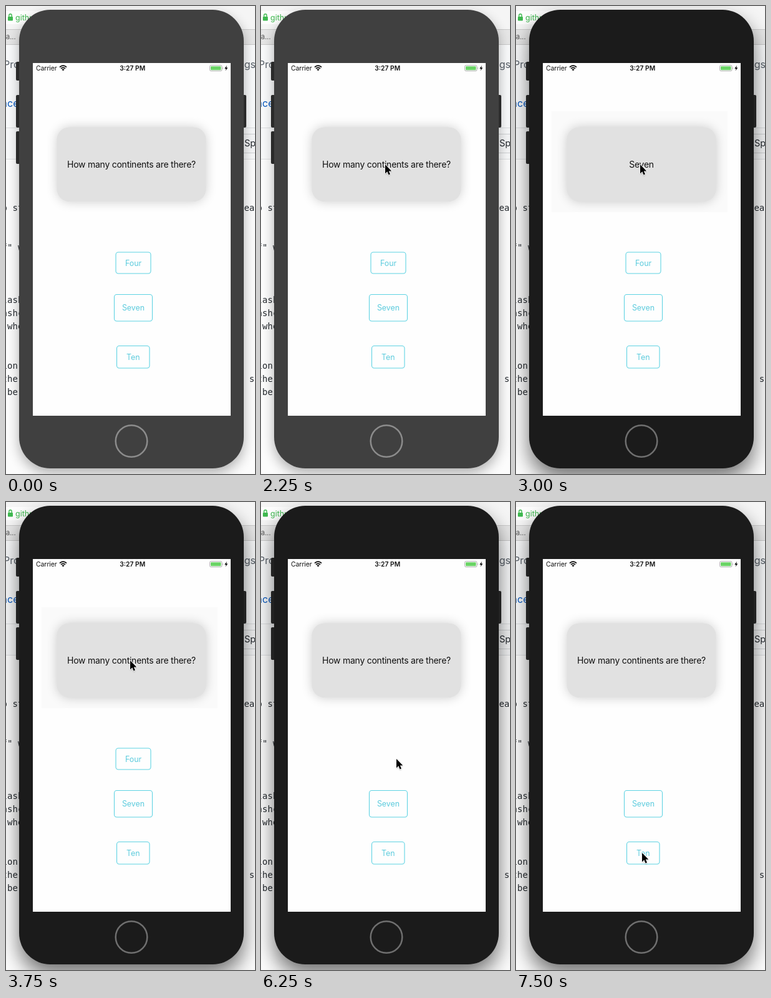
An HTML page for the animation above (8 s loop, 399 by 747 pixels).

```html
<!DOCTYPE html>
<html lang="en">
<head>
<meta charset="utf-8">
<title>Flashcard app</title>
<style>
  html, body { margin: 0; width: 100%; height: 100%; overflow: hidden; background: #f8f8f8; }
  svg { display: block; width: 399px; height: 747px; }
  text { font-family: Inter, Roboto, sans-serif; white-space: pre; }
  .code text { font: 14px "DejaVu Sans Mono", monospace; fill: #24292e; }
  .choice rect { fill: none; stroke: #5fd3e3; stroke-width: 1.1; }
  .choice text { font-size: 12.4px; fill: #5ccbdd; text-anchor: middle; }
</style>
</head>
<body>
<svg viewBox="0 0 399 747">
  <defs>
    <filter id="blur" x="-30%" y="-30%" width="160%" height="160%"><feGaussianBlur stdDeviation="9"/></filter>
    <filter id="phoneBlur" x="-30%" y="-30%" width="160%" height="160%"><feGaussianBlur id="spread" stdDeviation="10"/></filter>
    <filter id="cursorBlur" x="-50%" y="-50%" width="200%" height="200%"><feGaussianBlur stdDeviation="1"/></filter>
    <clipPath id="screen"><rect x="43" y="91" width="317" height="563"/></clipPath>
    <path id="arrow" d="M0 0V14.4L3.3 11.3L5.5 16.5L8 15.4L5.8 10.4H10.3Z"/>
  </defs>

  <!-- browser window behind the simulator -->
  <rect width="399" height="747" fill="#fcfcfc"/>
  <rect width="399" height="37" fill="#f5f5f5"/>
  <rect y="8" width="200" height="21" fill="#fdfdfd"/>
  <rect y="37" width="399" height="25" fill="#e6e6e6"/>
  <path d="M0 37.5H399M0 61.5H399" stroke="#c9c9c9"/>
  <rect y="62" width="399" height="132" fill="#f9fafb"/>
  <rect y="195" width="399" height="49" fill="#f7f8f9"/>
  <path d="M0 194.5H399M0 244.5H399" stroke="#dcdee0"/>
  <rect x="3" y="17" width="8" height="6.5" rx="1" fill="#3fb950"/>
  <path d="M4.8 17V15a2.2 2.2 0 0 1 4.4 0V17" fill="none" stroke="#3fb950" stroke-width="1.4"/>
  <text x="15" y="22.5" font-size="12.5" fill="#3fb950">github</text>
  <text x="0" y="53" font-size="11" fill="#555">a...</text>
  <text x="-4" y="98.500" font-size="16" fill="#586069">Projects</text>
  <text x="400" y="98.500" font-size="16" fill="#586069" text-anchor="end">ngs</text>
  <text x="20.500" y="161" font-size="16" fill="#0b5bc0" text-anchor="end">nce</text>
  <rect x="376.500" y="204.500" width="40" height="30" rx="3" fill="#f5f6f7" stroke="#cfd1d3"/>
  <text x="382" y="224" font-size="14.500" fill="#24292e">Sp</text>
  <g class="code" id="code"></g>

  <!-- phone -->
  <rect id="shade" x="21" y="6" width="360" height="732" rx="50" filter="url(#phoneBlur)"/>
  <path id="keys" d="M21 89H18q-2 0-2 2V117q0 2 2 2H21ZM21 142H18q-2 0-2 2V192q0 2 2 2H21ZM21 200H18q-2 0-2 2V250q0 2 2 2H21ZM380 142H383q2 0 2 2V192q0 2-2 2H380Z"/>
  <rect id="body" x="21" y="6" width="360" height="732" rx="50"/>
  <circle id="home" cx="201" cy="694.500" r="25.300" fill="none" stroke-width="2.500"/>
  <rect x="43" y="91" width="317" height="563" fill="#fefefe"/>

  <!-- status bar -->
  <text x="48" y="103" font-size="10.500" fill="#111" letter-spacing="-.1">Carrier</text>
  <g fill="none" stroke="#000" stroke-width="1.700">
    <path d="M86 97.700Q91.500 92.700 97 97.700M88 99.900Q91.500 96.900 95 99.900"/>
  </g>
  <path d="M89.400 101.300Q91.500 99.700 93.600 101.300L91.500 103.400Z"/>
  <text x="202.700" y="103" font-size="10.300" font-weight="600" fill="#111" text-anchor="middle">3:27 PM</text>
  <rect x="326.500" y="94.700" width="19.500" height="9" rx="2" fill="#fff" stroke="#9a9a9a" stroke-width=".8"/>
  <rect x="328" y="96.200" width="16.500" height="6" rx=".8" fill="#6ad465"/>
  <path d="M347 97.500q1.400 1.700 0 3.400Z" fill="#888"/>
  <path d="M354 94.800L350.300 99.900H352.600L351.600 103.600L355.400 98.400H353Z"/>

  <!-- card -->
  <g clip-path="url(#screen)">
    <rect id="halo" x="57" y="168" width="282" height="161" fill="#fafafa"/>
    <rect x="82" y="194" width="238" height="118" rx="20" fill="#000" opacity=".2" filter="url(#blur)"/>
    <rect x="81.500" y="193.500" width="239" height="118.500" rx="20" fill="#e1e1e1"/>
  </g>
  <text id="label" x="201" y="258" font-size="14" letter-spacing="-.25" fill="#111" text-anchor="middle"></text>

  <g id="choices"></g>

  <g id="cursor">
    <use href="#arrow" y="1.500" fill="#000" opacity=".35" filter="url(#cursorBlur)"/>
    <use href="#arrow" stroke="#fff" stroke-width="1.600" stroke-linejoin="round" paint-order="stroke"/>
  </g>
</svg>
<script>
const NS = "http://www.w3.org/2000/svg";
const $ = id => document.getElementById(id);
const LOOP = 8000;

function set(el, attrs) {
  for (const key in attrs) el.setAttribute(key, attrs[key]);
  return el;
}

function add(parent, tag, attrs, text = "") {
  const el = set(document.createElementNS(NS, tag), attrs);
  el.textContent = text;
  return parent.appendChild(el);
}

// code rows: line number, visible text, column
const column = i => -6.4 + 8.43 * i;
[[0, "o st", 0], [0, "ea", 46], [3, "f\" w", 0], [7, "lash", 0], [8, "ashc", 0], [9, " whe", 0],
 [12, "ion", 0], [13, "the", 0], [13, "s", 47], [14, " ber", 0]]
  .forEach(([row, text, col]) =>
    add($("code"), "text", { x: column(col), y: 327 + 21 * row }, text));

function choice(text, x, y, width, height) {
  const g = add($("choices"), "g", { class: "choice" });
  add(g, "rect", { x, y, width, height, rx: 4 });
  add(g, "text", { x: x + width / 2, y: y + height / 2 + 4.7 }, text);
  return g;
}
const four = choice("Four", 176, 393, 56, 34);
choice("Seven", 173.5, 460.5, 61, 42.5);
choice("Ten", 177.5, 542.5, 52.5, 35.5);

const stops = [
  [1000, 391, 201], [1250, 321, 222], [1500, 320, 224], [1750, 239, 240], [2000, 205, 248],
  [2250, 199, 253], [4500, 248, 327], [4750, 253, 340], [5000, 252, 393], [5250, 218, 412],
  [5500, 203, 410], [5750, 200, 410], [6000, 203, 410], [6250, 217, 410], [6500, 322, 487],
  [6750, 322, 493], [7000, 283, 539], [7250, 234, 555], [7500, 202, 560]
];

const show = (el, on) => set(el, { visibility: on ? "visible" : "hidden" });

function draw(t) {
  const active = t >= 2750;
  const flipped = t >= 3000 && t < 3750;
  set($("body"), { fill: active ? "#1b1b1b" : "#404040" });
  set($("keys"), { fill: active ? "#222" : "#2a2a2a" });
  set($("home"), { stroke: active ? "#6f6f6f" : "#8c8c8c" });
  set($("shade"), { opacity: active ? 0.55 : 0.3, transform: `translate(0 ${active ? 16 : 8})` });
  set($("spread"), { stdDeviation: active ? 16 : 10 });

  show($("halo"), t >= 3000 && t < 4750);
  $("label").textContent = flipped ? "Seven" : "How many continents are there?";
  show(four, t < 6000);

  const stop = stops.filter(s => s[0] <= t).pop();
  show($("cursor"), stop);
  if (stop) set($("cursor"), { transform: `translate(${stop[1]} ${stop[2]})` });
}

const start = performance.now();
function tick() {
  draw((performance.now() - start) % LOOP);
  requestAnimationFrame(tick);
}
tick();
</script>
</body>
</html>
```
